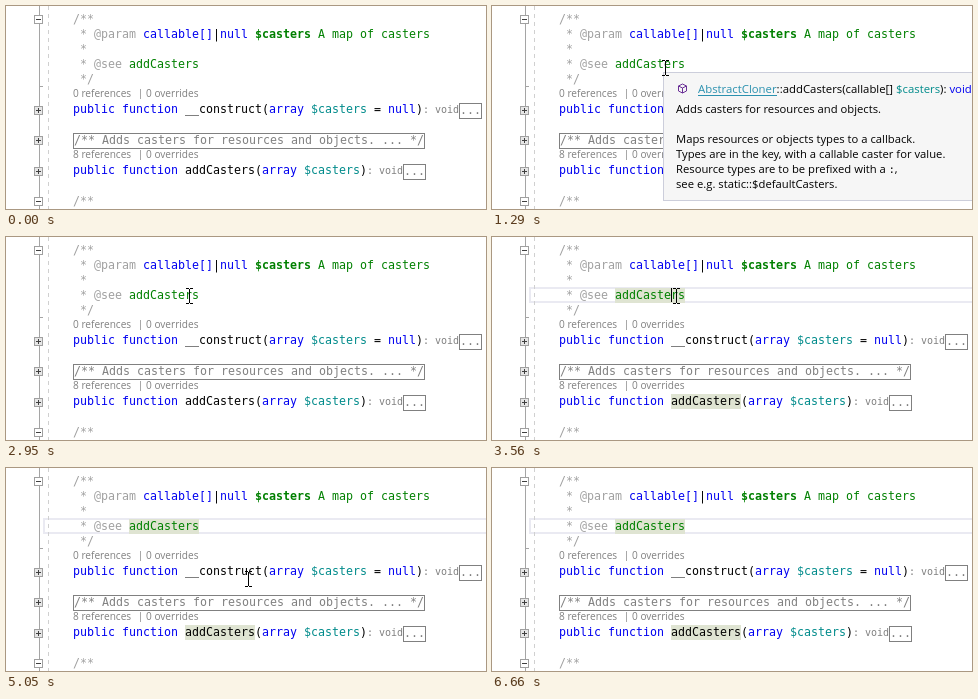
Recreate the animation shown at these times as an HTML page with a canvas. Size 480x203 px, loop 6760 ms.

```html
<!DOCTYPE html>
<html lang="en">
<head>
<meta charset="utf-8">
<title>Editor hover</title>
<style>
html, body { margin: 0; width: 100%; height: 100%; overflow: hidden; background: #fff; }
canvas { display: block; width: 480px; height: 203px; }
</style>
</head>
<body>
<canvas id="stage" width="480" height="203"></canvas>
<script>
const ctx = document.getElementById('stage').getContext('2d', { alpha: false });
const LOOP = 6760, LEFT = 67, COL = 7;
const MONO = '"DejaVu Sans Mono", monospace';
const SANS = '"Open Sans", "Noto Sans", sans-serif';
const CODE = '11.63px ' + MONO, BOLD = 'bold ' + CODE, HINT = '10px ' + MONO;
const LENS = '10.1px ' + SANS, HEAD = '11.36px ' + SANS, BODY = '11.25px ' + SANS;
const BLUE = '#0000f0', GREEN = '#008000', TEAL = '#008b8b', GREY = '#808080',
      PALE = '#a0a0a0', INK = '#000', LINK = '#2b91af', RULE = '#a5a5a5', MARK = '#dfe4d2';

// Pointer moves: start, end, ease-out power, cubic control points.
const moves = [
  [480, 1090, 1.6, [318, 204, 270, 150, 195, 110, 173, 62]],
  [2290, 2950, 1.3, [173, 62, 205, 72, 222, 84, 183, 59]],
  [3555, 4210, 1.1, [183, 58, 225, 80, 262, 115, 232, 151]],
  [4260, 4340, 1, [232, 151, 232, 153, 231, 156, 231, 158]],
  [4850, 5480, 1.5, [231, 158, 250, 130, 245, 75, 220, 59]],
  [5760, 6350, 1, [220, 59, 260, 60, 400, 120, 427, 212]]
];

// Tooltip: start, end, left, top.
const tips = [[1290, 2410, 171, 66], [3040, 3080, 181, 66], [4490, 4910, 229, 172]];
const clicks = [[3080, 183, 58], [5510, 220, 58]];

const tipBody = [
  [0, 'Adds casters for resources and objects.'],
  [2, 'Maps resources or objects types to a callback.'],
  [3, 'Types are in the key, with a callable caster for value.'],
  [5, 'see e.g. static::$defaultCasters.']
];

function rect(x, y, w, h, color) {
  ctx.fillStyle = color;
  ctx.fillRect(x, y, w, h);
}

function frame(x, y, w, h, color) {
  ctx.strokeStyle = color;
  ctx.lineWidth = 1;
  ctx.strokeRect(x + 0.5, y + 0.5, w - 1, h - 1);
}

function text(str, x, y, font, color) {
  ctx.font = font;
  ctx.fillStyle = color;
  ctx.fillText(str, x, y);
  return x + ctx.measureText(str).width;
}

// Code runs: column, string, colour, optional font.
function code(y, ...runs) {
  for (const [col, str, color, font] of runs) text(str, LEFT + col * COL, y, font || CODE, color);
}

function lens(count, y) {
  text(count + ' references', 67, y, LENS, GREY);
  rect(134, y - 8, 1, 10, '#a8a8a8');
  text('0 overrides', 140, y, LENS, GREY);
}

function toggle(y, closed) {
  rect(28, y - 4, 9, 9, closed ? '#e6e6e6' : '#fff');
  frame(28, y - 4, 9, 9, '#a0a0a0');
  rect(30, y, 5, 1, '#404040');
  if (closed) rect(32, y - 2, 1, 5, '#404040');
}

function margin() {
  rect(33, 0, 1, 203, RULE);
  rect(33, 80, 4, 1, RULE);
  toggle(13, false);
  [104, 134, 165].forEach(y => toggle(y, true));
  toggle(195, false);
  for (let y = 0; y < 203; y += 8) rect(42, y, 1, 4, '#d0d0d0');
}

function ellipsis(x, y) {
  frame(x, y, 23, 16, GREY);
  text('...', x + 1, y + 11, CODE, GREY);
}

function editor() {
  margin();
  code(17, [0, '/**', PALE]);
  code(32, [1, '* @param', PALE], [10, 'callable[]', BLUE], [20, '|', INK], [21, 'null', BLUE],
    [26, '$casters', GREEN, BOLD], [35, 'A map of casters', GREEN]);
  code(47, [1, '*', PALE]);
  code(62, [1, '* @see', PALE], [8, 'addCasters', GREEN]);
  code(77, [1, '*/', PALE]);
  lens(0, 91);
  code(107, [0, 'public function', BLUE], [16, '__construct(', INK], [28, 'array', BLUE],
    [34, '$casters', TEAL], [43, '=', INK], [45, 'null', BLUE], [49, ')', INK]);
  text(': void', 417, 107, HINT, GREY);
  ellipsis(453, 97);
  frame(67, 127, 352, 16, GREY);
  text('/** Adds casters for resources and objects. ... */', 68, 138, CODE, GREY);
  lens(8, 152);
  code(168, [0, 'public function', BLUE], [16, 'addCasters(', INK], [27, 'array', BLUE],
    [33, '$casters', TEAL], [41, ')', INK]);
  text(': void', 361, 168, HINT, GREY);
  ellipsis(397, 158);
  code(199, [0, '/**', PALE]);
}

function cube(x, y) {
  ctx.strokeStyle = '#6a2f96';
  ctx.lineWidth = 1;
  ctx.beginPath();
  ctx.moveTo(x, y - 4.5);
  ctx.lineTo(x + 4, y - 2.5);
  ctx.lineTo(x + 4, y + 2.5);
  ctx.lineTo(x, y + 4.5);
  ctx.lineTo(x - 4, y + 2.5);
  ctx.lineTo(x - 4, y - 2.5);
  ctx.closePath();
  ctx.moveTo(x - 4, y - 2.5);
  ctx.lineTo(x, y - 0.5);
  ctx.lineTo(x + 4, y - 2.5);
  ctx.moveTo(x, y - 0.5);
  ctx.lineTo(x, y + 4.5);
  ctx.stroke();
}

function tooltip(x, y) {
  rect(x, y, 330, 129, '#f6f6f6');
  frame(x, y, 330, 129, '#cccedb');
  cube(x + 19.5, y + 16.5);

  const base = y + 21, start = x + 35;
  let pen = text('AbstractCloner', start, base, HEAD, LINK);
  rect(start, base + 2, Math.round(pen - start), 1, LINK);
  const runs = [['::addCasters(callable[] ', INK], ['$casters', TEAL], ['): ', INK], ['void', BLUE]];
  for (const [str, color] of runs) pen = text(str, pen, base, HEAD, color);

  const left = x + 13, row = k => y + 41 + 15 * k;
  for (const [k, str] of tipBody) text(str, left, row(k), BODY, INK);
  pen = text('Resource types are to be prefixed with a ', left, row(4), BODY, INK);
  pen = text(':', pen, row(4), HINT, INK);
  text(',', pen, row(4), BODY, INK);
}

function bezier(p, u) {
  const v = 1 - u;
  const at = i => v * v * v * p[i] + 3 * v * v * u * p[i + 2] +
    3 * v * u * u * p[i + 4] + u * u * u * p[i + 6];
  return [Math.round(at(0)), Math.round(at(1))];
}

function pointer(t) {
  if (t < 500 || t >= 6350) return;
  const [from, to, power, path] = moves.filter(m => t >= m[0]).pop();
  const u = Math.min(1, (t - from) / (to - from));
  const [x, y] = bezier(path, 1 - Math.pow(1 - u, power));
  rect(x, y - 7, 1, 14, INK);
  for (const row of [y - 8, y + 7]) {
    rect(x - 3, row, 3, 1, INK);
    rect(x + 1, row, 3, 1, INK);
  }
}

function caret(t) {
  const second = t >= 5510;
  const on = second
    ? t < 6035 || (t >= 6560 && t < 6660)
    : t >= 3080 && Math.floor((t - 3080) / 530) % 2 === 0;
  if (on) rect(second ? 193 : 179, 51, 1, 14, INK);
}

function draw(t) {
  rect(0, 0, 480, 203, '#fff');
  if (t >= 3080) {
    ctx.strokeStyle = '#eaeaf2';
    ctx.lineWidth = 2;
    ctx.strokeRect(38, 51, 460, 14);
  }
  if (t >= 3140) {
    rect(123, 51, 70, 15, MARK);
    rect(179, 157, 70, 15, MARK);
  }
  editor();
  caret(t);
  for (const [from, to, x, y] of tips) if (t >= from && t < to) tooltip(x, y);
  for (const [from, x, y] of clicks) {
    if (t < from || t >= from + 100) continue;
    ctx.fillStyle = 'rgba(255, 255, 0, 0.47)';
    ctx.beginPath();
    ctx.arc(x, y, 12, 0, Math.PI * 2);
    ctx.fill();
  }
  pointer(t);
}

const begin = performance.now();
function tick() {
  draw((performance.now() - begin) % LOOP);
  requestAnimationFrame(tick);
}
tick();
</script>
</body>
</html>
```
